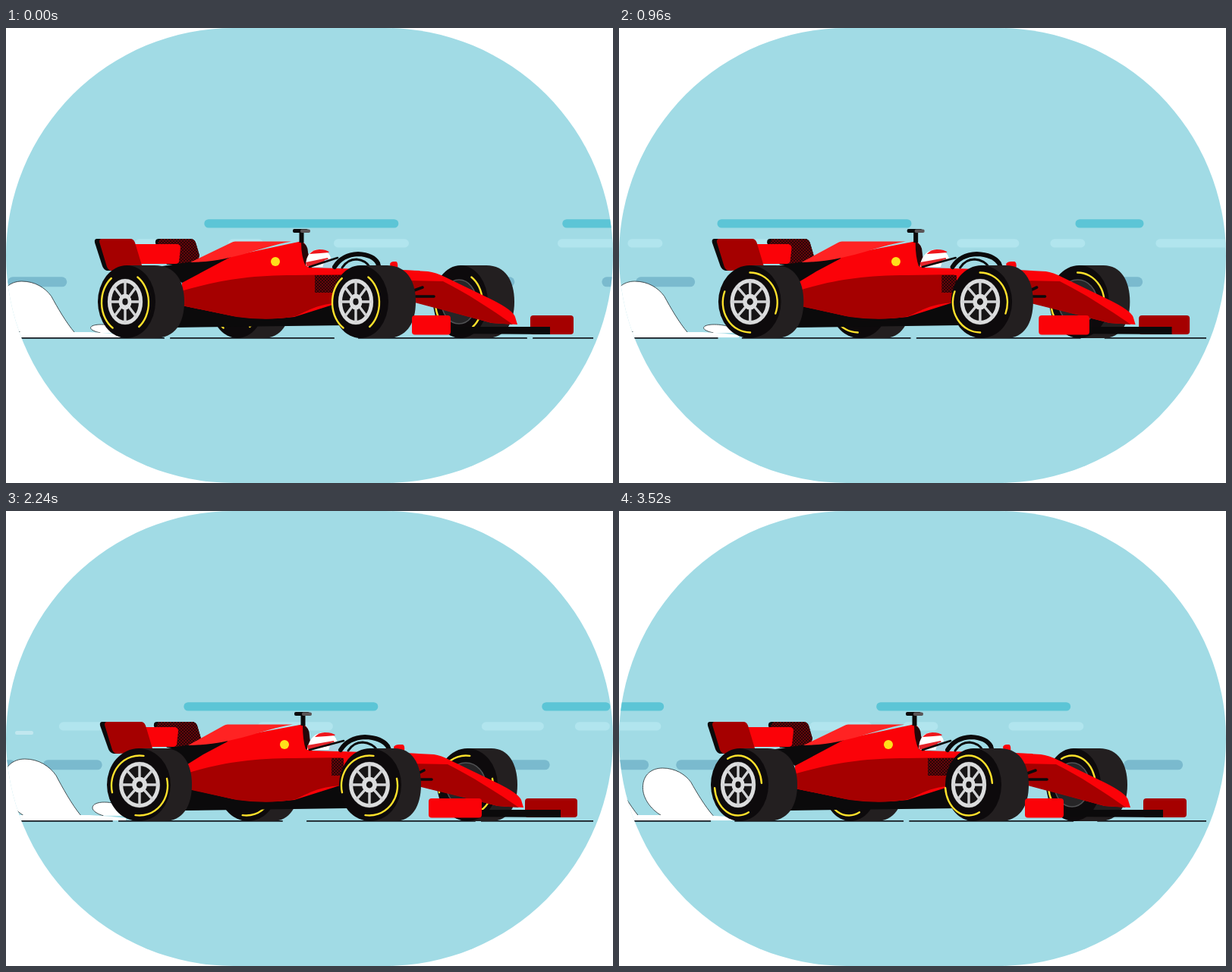
Animation of 800 by 600 pixels, one loop 3.56 s. Source, as an HTML page:

```html
<!DOCTYPE html>
<html>
<head>
<meta charset="utf-8">
<style>
html, body { margin: 0; width: 100%; height: 100%; overflow: hidden; background: #fff; }
svg { display: block; width: 800px; height: 600px; }
</style>
</head>
<body>
<svg viewBox="0 0 800 600">
  <defs>
    <clipPath id="stage"><rect width="800" height="600" rx="300"/></clipPath>
    <clipPath id="road"><rect x="20" y="400" width="754" height="20"/></clipPath>
    <pattern id="mesh" width="4" height="4" patternUnits="userSpaceOnUse">
      <rect width="4" height="4" fill="#64060a"/>
      <path d="M0 0H2V2H0ZM2 2H4V4H2Z" fill="#2a0507"/>
    </pattern>
  </defs>
  <g clip-path="url(#stage)">
    <rect width="800" height="600" fill="#a1dbe5"/>
    <g id="wind"></g>
    <g id="smoke"></g>
    <g id="ground" clip-path="url(#road)"></g>
    <g id="car"></g>
    <g id="streaks"></g>
  </g>
</svg>
<script>
const STEP = 40, FRAMES = 89;
const RED = '#fb0208', LIGHT = '#ff2323', DARK = '#a50000', BLACK = '#0b0a0b', TYRE = '#231f20', YELLOW = '#ffe12b';
const layer = id => document.getElementById(id);
const clamp = v => Math.max(0, Math.min(1, v));
const smooth = v => (v = clamp(v), v * v * (3 - 2 * v));
const mod = (a, b) => (a % b + b) % b;

// Bands repeat every `period`; parts are [offset, length].
const bands = [
  { y: 252.2, h: 11.4, fill: '#5cc5d6', start: 261.3, period: 842, v: -75.66, parts: [[0, 256], [472, 90]] },
  { y: 278.3, h: 11.2, fill: '#b1e5ee', start: 432, period: 557, v: -557 * 13 / FRAMES, parts: [[0, 99], [295, 82], [418, 46]] },
  { y: 328.3, h: 13, fill: '#7abace', start: 195.3, period: 590, v: -590 * 11 / FRAMES, parts: [[0, 37], [55, 61], [169, 192], [397, 78]] }
];
const road = { y: 408, h: 1.8, fill: '#151a20', start: 216, period: 478, v: 67.07, parts: [[0, 217], [248, 223]] };

// Puffs leave the rear wheel, grow and drift back: [birth, full height]
const PUFF_CYCLE = 24, PUFF_SPEED = 23.6;
const puffs = [[-.1, 40], [3, 75], [8, 72], [12.5, 63], [18.9, 68]];

let p = 0; // how far the car has turned towards the viewer

// "x:d" in a path means x + d * p
const flex = d => d.replace(/(-?[\d.]+):(-?[\d.]+)/g, (_, a, b) => (+a + b * p).toFixed(2));
const shape = (d, fill) => `<path d="${flex(d)}" fill="${fill}"/>`;
const line = (d, w, color = BLACK) =>
  `<path d="${flex(d)}" fill="none" stroke="${color}" stroke-width="${w}" stroke-linecap="round"/>`;
const oval = (x, y, rx, ry, fill, extra = '') =>
  `<ellipse cx="${x}" cy="${y}" rx="${rx}" ry="${ry}" fill="${fill}" ${extra}/>`;
const box = (x, y, w, h, r, fill, extra = '') =>
  `<rect x="${x}" y="${y}" width="${w}" height="${h}" rx="${r}" fill="${fill}" ${extra}/>`;

function band(b, n) {
  const x0 = mod(b.start + b.v * n, b.period);
  let s = '';
  for (let k = -2; k < 3; k++)
    for (const [off, len] of b.parts) {
      const x = x0 + off + k * b.period;
      if (x < 800 && x + len > 0) s += box(x.toFixed(1), b.y, len, b.h, b.h / 2, b.fill);
    }
  return s;
}

function puff(l, w, h) {
  const at = (x, y) => `${(l + w * x).toFixed(1)} ${(402 - h * y).toFixed(1)} `;
  const d = 'M' + at(.26, .01) + 'C' + at(.11, .14) + at(0, .37) + at(0, .59) +
    'C' + at(0, .87) + at(.13, 1) + at(.28, 1) + 'C' + at(.46, 1) + at(.6, .87) + at(.68, .71) +
    'C' + at(.76, .5) + at(.88, .2) + at(1, 0);
  return `<path d="${d}" fill="#fff" stroke="#20272b" stroke-width=".8"/>`;
}

function smoke(n) {
  const drawn = puffs
    .map(([birth, full]) => [mod(n - birth + 1, PUFF_CYCLE) - 1, full])
    .filter(([age]) => age < 10)
    .sort((a, b) => b[0] - a[0])
    .map(([age, full]) => {
      const h = full * clamp((age + 1) / 4);
      return puff(114 - PUFF_SPEED * age, 40 + .84 * h, h);
    });
  return drawn.join('') + shape('M0 401H110Q135 402 158 405V408H0Z', '#fff');
}

function arcs(x, rx, turn) {
  const pt = deg => {
    const a = deg * Math.PI / 180;
    return `${(x + rx * Math.cos(a)).toFixed(1)} ${(362 + 39.5 * Math.sin(a)).toFixed(1)}`;
  };
  return [0, 180].map(k =>
    line(`M${pt(turn + k - 56)}A${rx} 39.5 0 0 1 ${pt(turn + k + 56)}`, 2.4, YELLOW)).join('');
}

function tyre(x, rx, right) {
  const top = x + (right - x) * .48;
  return shape(`M${x} 313H${top}C${right - 12} 313 ${right} 333 ${right} 361S${right - 12} 409 ${top} 409H${x}Z`, TYRE) +
    oval(x, 361, rx, 48, '#0d0a0c');
}

function farWheel(x, right, turn) {
  const rx = 36 + 4 * p;
  return tyre(x + 2, rx, right) +
    oval(x, 361, 23 + 3 * p, 29, '#262527', 'stroke="#505153" stroke-width="1.5"') + arcs(x, 31 + 5 * p, turn);
}

function nearWheel(x, face, rx, right, turn) {
  const rim = 20.5 + 3.8 * p;
  let s = tyre(face, rx, right) + oval(x, 361, rim + 2.8, 30.5, '#3d3c3e') +
    oval(x, 361, rim, 27.5, '#171516', 'stroke="#dcddde" stroke-width="5"');
  for (let i = 0; i < 8; i++) {
    const a = i * Math.PI / 4;
    s += line(`M${x} 361L${x + rim * Math.cos(a)} ${361 + 27.5 * Math.sin(a)}`, 3.4, '#d3d4d6');
  }
  return s + oval(x, 361, 8.5 + 1.5 * p, 10.5, '#dcddde') + oval(x, 361, 3.6 + .6 * p, 4.4, '#171516') +
    arcs(x, 31 + 6 * p, turn);
}

function rearWing() {
  return shape('M201:-2 278H243:2Q248:2 278 250:2 283L255:2 300Q253:2 311 245:2 312H212L197:-2 284Q196:-2 278 201:-2 278Z', BLACK) +
    shape('M203:-2 278H243:2Q248:2 278 250:2 283L255:2 300Q253:2 309 246:2 311H214L200:-2 284Z', 'url(#mesh)') +
    shape('M168:12 285H226:-3Q230:-3 286 230:-3 290L228:-3 308Q227:-3 311 223:-3 311H174:12Z', RED) +
    shape('M120:7 278H128:7L142:8 320H133:9Q129:8 319 127:8 314L117:7 283Q116:7 278 120:7 278Z', BLACK) +
    shape('M126:7 278H164:14Q168:14 278 170:14 283L179:14 313Q179:14 318 174:14 318L140:7 320Q135:7 320 133:7 315L123:7 282Q123:7 278 126:7 278Z', DARK);
}

function body() {
  return shape('M200 315L246:-3 308L310 300L300 332L232 336Z', BLACK) +
    shape('M222 358H450V392L222:10 395Z', BLACK) +
    // main flank
    shape('M232:4 336L260 321L292 304L301:-10 300L388:2 281.5Q394:2 282 396:2 289L403 316L440 317L545 320L560 362H440L380 381Q340 386 300 380L232:6 366Z', RED) +
    shape('M243:-3 309L297:-10 283Q299:-10 281.5 302:-10 281.5H376:2C330 290 300 308 243:-3 309Z', LIGHT) +
    shape('M234:4 346C280 333 320 326 380 326L442 325V362C410 364 400 372 382 380Q345 387 304 381L232:4 366Z', DARK) +
    shape('M407:22 326H445V349H407:22Z', 'url(#mesh)') +
    // nose
    shape('M505 318L556:8 321Q566:7 322 580:6 329L640:6 358Q668:7 372 671:8 381L674:8 391L640:8 389L535 360Z', RED) +
    shape('M530 333L576:6 334C606:6 349 640:7 371 668:8 391L640:8 389L535 361Z', DARK) +
    line('M538:5 346L549:2 342M540:3 354H564:-3', 3.6);
}

function cockpit() {
  const bar = 378 + 2 * p;
  return shape('M389:2 282Q398:2 285 398:2 296L402 316L395 314Q389:2 302 389:2 282Z', '#260608') +
    shape('M395:2 313Q396:6 292 413:7 292Q427:8 294 428:8 304L432:8 315H397Z', '#fff') +
    shape('M400:7 298Q405:7 292 413:7 292Q423:8 292 426:8 296L414:8 297Z', '#ee151b') +
    shape('M395:2 309L424:8 303L426:8 308L396:2 315Z', '#e3242a') +
    shape('M420:8 306L432:8 303L440:8 316H417:8Z', '#a9d3e2') +
    line('M400 315L437:8 303', 2.6) +
    line('M433:8 315Q443:8 299 464:9 298Q484:11 299 490:13 310L492:14 317', 6) +
    line('M443:8 316Q450:8 305 462:8 305Q474:9 306 480:10 316', 3) +
    shape('M506:5 311Q507:6 308 511:7 308H514:9Q517:9 309 516:9 317H507:5Z', RED) +
    box(386.5 + 2 * p, 268, 6, 15, 0, BLACK) + box(bar, 265, 20, 5, 2, BLACK) +
    box(bar + 10, 265.5, 13, 4.5, 2, '#5b5557') +
    oval(355 + 12 * p, 308, 6, 6, '#ffdf1a');
}

function frontWing() {
  const near = 535 + 22 * p, far = 691 - 7 * p;
  return box(far, 379, 57 + 12 * p, 25, 4, DARK) +
    shape('M580 394L717:14 394V404L580 403Z', BLACK) +
    box(near, 379, 51 + 19 * p, 25.5, 4, RED);
}

function car(n) {
  const turn = -2 + 180 * 29 / FRAMES * n;
  const bump = Math.max(0, 1 - Math.abs(n - 75) / 3);
  p = smooth((n - 10) / 19) * (1 - smooth((n - 57) / 18)) - .03 * bump;
  return farWheel(303 + 14 * p, 375 + 11 * p, turn) + farWheel(597 + 9 * p, 670 + 4 * p, turn) +
    `<g transform="translate(0 ${-bump})">` + rearWing() + body() + cockpit() + '</g>' +
    nearWheel(157 + 19 * p, 159 + 16 * p, 38 + 4 * p, 235 + 10 * p, turn) +
    nearWheel(461 + 18 * p, 467 + 13 * p, 37 + 4 * p, 540 + 7 * p, turn) +
    `<g transform="translate(0 ${-bump})">` + frontWing() + '</g>';
}

function streak(n, at, x, y, w, h) {
  const k = n - at;
  return Math.abs(k) > 2 ? '' : box(x - 80 * k, y, w, h, h / 2, '#d3eff5', 'opacity=".65"');
}

function draw(n) {
  layer('wind').innerHTML = bands.map(b => band(b, n)).join('');
  layer('smoke').innerHTML = smoke(n);
  layer('ground').innerHTML = band(road, n);
  layer('car').innerHTML = car(n);
  layer('streaks').innerHTML = streak(n, 32, 456, 348, 110, 8) + streak(n, 56, 12, 290, 24, 5);
}

const begin = performance.now();
let shown = -1;
function tick() {
  const n = Math.floor((performance.now() - begin) / STEP) % FRAMES;
  if (n !== shown) draw(shown = n);
  requestAnimationFrame(tick);
}
tick();
</script>
</body>
</html>
```
